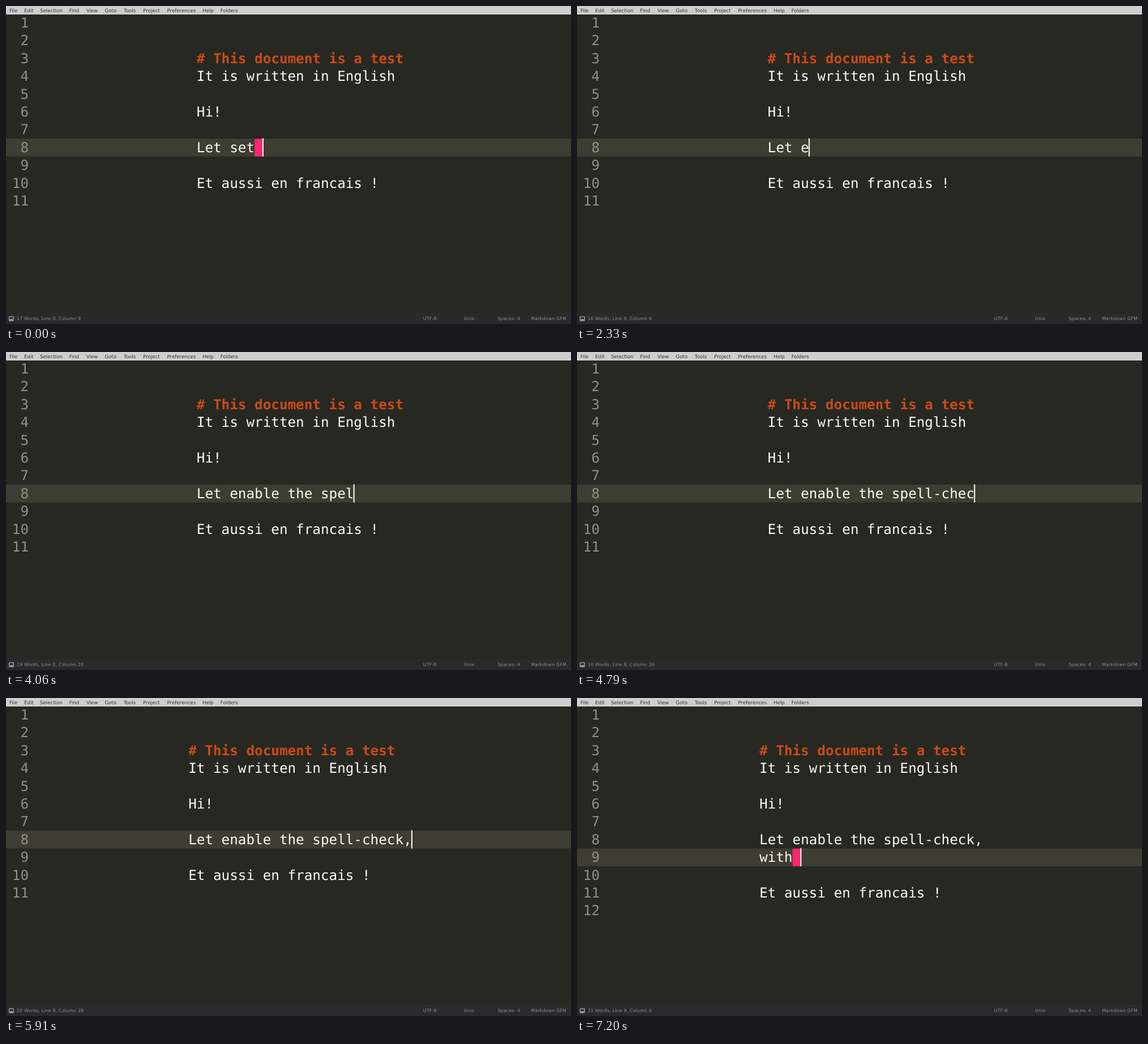
Recreate the animation shown at these times as an HTML page. Size 998x561 px, loop 8 s.

```html
<!DOCTYPE html>
<html lang="en">
<head>
<meta charset="utf-8">
<title>Typing in a text editor</title>
<style>
  html, body { margin: 0; width: 100%; height: 100%; overflow: hidden; background: #272822; }
  svg { display: block; }
  text { white-space: pre; text-rendering: geometricPrecision; font-family: "DejaVu Sans", sans-serif; }
  #menu text { font-size: 8.6px; fill: #303030; }
  #status text { font-size: 7.8px; letter-spacing: .22px; fill: #919193; }
  #gutter text, #lines text { font: 24.27px "DejaVu Sans Mono", monospace; }
  #gutter text { fill: #8f908a; text-anchor: end; }
  #lines text { fill: #fafaf6; }
  #lines .heading { fill: #cb4b16; font-weight: bold; }
</style>
</head>
<body>
<svg width="998" height="561" viewBox="0 0 998 561">
  <rect width="998" height="561" fill="#272822"/>
  <rect id="row" width="998" height="31.4" fill="#3e3d32"/>
  <g id="gutter"></g>
  <rect id="trail" width="14.61" height="31" fill="#f92672"/>
  <g id="lines"></g>
  <rect id="caret" width="2" height="32.2" fill="#fff"/>
  <rect width="998" height="15" fill="#cecece"/>
  <g id="menu"></g>
  <rect y="542" width="998" height="19" fill="#2a2a2d"/>
  <rect x="5.6" y="548.1" width="7.8" height="7.3" rx=".8" fill="none" stroke="#b0b0b2" stroke-width="1.2"/>
  <rect x="6.6" y="552.4" width="5.8" height="2" fill="#b0b0b2"/>
  <g id="status"></g>
</svg>
<script>
const LOOP = 8000, CHAR = 14.61, ROW = 31.4, TOP = 14.2, BASE = 23.7, LEFT = 336.8;

// Keystrokes by time; "<" is a backspace.
const keys = [
  [0, 'Let set '], [400, '<<<<'],
  [2330, 'e'], [2430, 'n'], [2540, 'a'], [2680, 'b'], [2780, 'l'], [2870, 'e'], [2970, ' '],
  [3060, 't'], [3210, 'h'], [3260, 'e'], [3410, ' '],
  [3700, 's'], [3790, 'p'], [3950, 'e'], [4060, 'l'], [4230, 'l'], [4410, '-'],
  [4570, 'c'], [4700, 'he'], [4790, 'c'], [5530, 'k '], [5810, '<'], [5910, ','], [6340, '\n'],
  [6670, 'w'], [6770, 'i'], [6880, 't'], [6980, 'h'], [7200, ' ']
];
// The word count follows the typing with a short delay.
const counts = [[0, 17], [450, 16], [2480, 17], [3210, 18], [3850, 19], [4700, 20], [6820, 21]];

const before = ['', '', '# This document is a test', 'It is written in English', '', 'Hi!', ''];
const after = ['', 'Et aussi en francais !', ''];

const $ = id => document.getElementById(id);
const label = (x, y, s, cls = '') => `<text x="${x}" y="${y}" class="${cls}">${s}</text>`;
const place = (el, x, y) => { el.setAttribute('x', x); el.setAttribute('y', y); };
const rowTop = i => TOP + ROW * i;

const menu = { File: 6, Edit: 32, Selection: 60, Find: 111.6, View: 142, Goto: 174.6, Tools: 208,
  Project: 242.2, Preferences: 284.6, Help: 347.2, Folders: 378.8 };
$('menu').innerHTML = Object.entries(menu).map(([s, x]) => label(x, 10.8, s)).join('');

function typed(t) {
  let s = '';
  for (const [at, str] of keys) {
    if (at > t) break;
    for (const c of str) s = c === '<' ? s.slice(0, -1) : s + c;
  }
  return s;
}

function draw(text, words) {
  const own = text.split('\n'), current = own[own.length - 1], col = current.length;
  const lines = [...before, ...own, ...after];
  const row = before.length + own.length - 1, y = rowTop(row);
  // The centred column moves left by one cell once a line outgrows 26 characters.
  const x = LEFT - (Math.max(...lines.map(l => l.length)) > 26 ? CHAR : 0);

  $('gutter').innerHTML = lines.map((_, i) => label(40, rowTop(i) + BASE, i + 1)).join('');
  $('lines').innerHTML = lines.map((l, i) =>
    label(x, rowTop(i) + BASE, l, l[0] === '#' ? 'heading' : '')).join('');
  place($('row'), 0, y);
  place($('caret'), x - .8 + col * CHAR, y - .6);
  place($('trail'), x + (col - 1) * CHAR, y + .4);
  $('trail').style.display = current.endsWith(' ') ? '' : 'none';
  $('status').innerHTML =
    label(19, 554.4, `${words} Words, Line ${row + 1}, Column ${col + 1}`) +
    label(736.8, 554.4, 'UTF-8') + label(809.3, 554.4, 'Unix') +
    label(868.4, 554.4, 'Spaces: 4') + label(927.4, 554.4, 'Markdown GFM');
}

let last;
function frame() {
  const t = performance.now() % LOOP;
  const text = typed(t), words = counts.filter(c => c[0] <= t).pop()[1];
  const state = words + text;
  if (state !== last) draw(text, words);
  last = state;
  requestAnimationFrame(frame);
}
frame();
</script>
</body>
</html>
```
